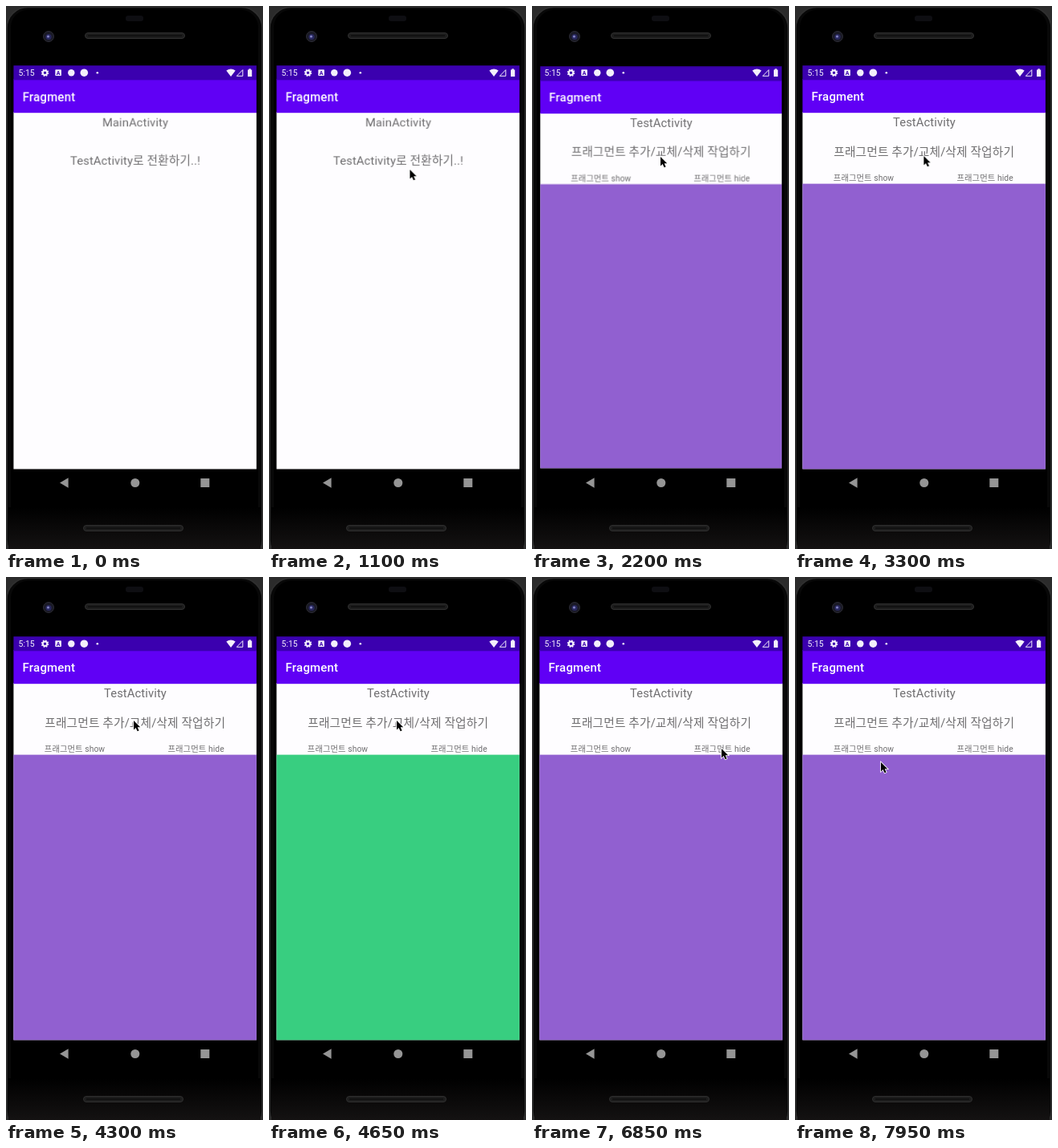
Animation of 320x677 px, one loop 8 s. Source, as an HTML page:

```html
<!DOCTYPE html>
<html lang="ko">
<head>
<meta charset="utf-8">
<title>Fragment demo</title>
<style>
html, body { margin: 0; width: 100%; height: 100%; overflow: hidden; background: #000; }
svg { display: block; width: 100%; height: 100%; }
text { font-family: Roboto, "Noto Sans CJK KR", "Noto Sans CJK", sans-serif; }

.bar { fill: #3b00af; }
.tool { fill: #6000f5; }
.page { fill: #fefdff; }
.title { font-size: 15px; font-weight: 500; letter-spacing: .0125em; fill: #fff; }
.label { font-size: 14.73px; letter-spacing: .008em; fill: #6f6e70; text-anchor: middle; }
.small { font-size: 10.31px; }
.clock { font-size: 10.4px; fill: #f3effb; }
.status { fill: #f3effb; }
.nav { fill: #959595; }

.window { transform-origin: 160.5px 343.5px; }
.leave { animation: leave 8s infinite, vanish 8s linear infinite; }
.enter { animation: enter 8s infinite, appear 8s linear infinite; }
.panel { animation: panel 8s step-end infinite; }
.cursor { animation: move 8s linear infinite, show 8s step-end infinite; }

/* Activity change: fast out, extra slow in */
@keyframes leave {
  0% { transform: scale(1); }
  24.325% { transform: scale(1); animation-timing-function: cubic-bezier(.3, 0, .8, .15); }
  25.24% { transform: scale(1.02); animation-timing-function: cubic-bezier(.05, .7, .1, 1); }
  29.825%, 100% { transform: scale(1.05); }
}
@keyframes enter {
  0% { transform: scale(.85); }
  24.325% { transform: scale(.85); animation-timing-function: cubic-bezier(.3, 0, .8, .15); }
  25.24% { transform: scale(.91); animation-timing-function: cubic-bezier(.05, .7, .1, 1); }
  29.825%, 100% { transform: scale(1); }
}
@keyframes appear {
  0%, 24.99% { opacity: 0; }
  25.6%, 100% { opacity: 1; }
}
@keyframes vanish {
  0%, 25.6% { opacity: 1; }
  26.8%, 100% { opacity: 0; }
}
@keyframes panel {
  0% { fill: #9160d0; }
  58.125% { fill: #38ce80; }
  85.625%, 100% { fill: #9160d0; }
}
@keyframes show {
  0% { opacity: 0; }
  2.5%, 100% { opacity: 1; }
}
@keyframes move {
  0%, 2.5% { transform: translate(98px, 307px); }
  3.75%, 5% { transform: translate(134px, 281px); }
  6.875%, 8.75% { transform: translate(190px, 220px); }
  19.375% { transform: translate(159px, 186px); }
  21.25%, 40.625% { transform: translate(160px, 188px); }
  51.25% { transform: translate(166px, 171px); }
  53.75%, 68.125% { transform: translate(159px, 179px); }
  73.75% { transform: translate(205px, 228px); }
  78.125% { transform: translate(227px, 210px); }
  78.75% { transform: translate(233px, 210px); }
  80.625% { transform: translate(239px, 209px); }
  83.125%, 94.375% { transform: translate(236px, 214px); }
  98.125% { transform: translate(122px, 239px); }
  99.375%, 100% { transform: translate(107px, 231px); }
}
</style>
</head>
<body>
<svg viewBox="0 0 320 677">
  <defs>
    <linearGradient id="chin" x1="0" y1="0" x2="0" y2="1">
      <stop offset="0" stop-color="#000"/>
      <stop offset="1" stop-color="#141212"/>
    </linearGradient>
    <clipPath id="screen"><rect x="9.4" y="74.2" width="302.5" height="539"/></clipPath>
    <g id="chrome">
      <rect x="9.4" y="74.2" width="302.5" height="539"/>
      <rect class="page" x="9.4" y="132" width="302.5" height="445.3"/>
      <rect class="tool" x="9.4" y="91" width="302.5" height="42.2"/>
      <rect class="bar" x="9.4" y="74.2" width="302.5" height="18.1"/>
      <text class="title" x="20.6" y="118.3">Fragment</text>
    </g>
    <g id="speaker">
      <rect x=".5" y=".5" width="124" height="7" rx="3.5" fill="#1d1d1d" stroke="#303030"/>
      <path d="M4 4H121" stroke="#111" stroke-width="2"/>
    </g>
  </defs>

  <!-- Phone body -->
  <rect width="320" height="677" fill="#2b2b2b"/>
  <rect x="1" y="1.5" width="318" height="690" rx="26" fill="#080808" stroke="#303030" stroke-width="1.5"/>
  <rect x="6" y="4.5" width="308" height="690" rx="22"/>
  <rect x="3" y="625" width="314" height="52" fill="url(#chin)"/>
  <rect x="149" y="12" width="22" height="7" rx="3" fill="#0e0e12"/>
  <use href="#speaker" x="98" y="33"/>
  <use href="#speaker" x="96" y="647"/>
  <circle cx="53" cy="38" r="6.5" fill="#1a1a26" stroke="#2c2c34"/>
  <circle cx="53" cy="38.5" r="3.6" fill="#28285e"/>
  <circle cx="52.5" cy="38" r="1.6" fill="#8080c0"/>

  <g clip-path="url(#screen)">
    <rect x="9" y="74" width="303" height="540"/>
    <g class="window leave">
      <use href="#chrome"/>
      <text class="label" x="161" y="150">MainActivity</text>
      <text class="label" x="161" y="198">TestActivity로 전환하기..!</text>
    </g>
    <g class="window enter">
      <use href="#chrome"/>
      <text class="label" x="161" y="150">TestActivity</text>
      <text class="label" x="160.7" y="186.5">프래그먼트 추가/교체/삭제 작업하기</text>
      <text class="label small" x="85.5" y="218.3">프래그먼트 show</text>
      <text class="label small" x="236.6" y="218.3">프래그먼트 hide</text>
      <rect class="panel" x="9.4" y="221.6" width="302.5" height="355.7"/>
    </g>
  </g>

  <!-- Status bar -->
  <text class="clock" x="15.6" y="87">5:15</text>
  <g class="status">
    <g fill="none" stroke="#f3effb">
      <circle cx="48.5" cy="83.2" r="2.7" stroke-width="2"/>
      <circle cx="48.5" cy="83.2" r="4" stroke-width="1.6" stroke-dasharray="1.7 1.44"/>
    </g>
    <rect x="61.3" y="79.3" width="7.6" height="7.8" rx=".8"/>
    <text x="65.1" y="85.8" font-size="7" font-weight="700" text-anchor="middle" fill="#3b00af">A</text>
    <circle cx="81.3" cy="83.2" r="4.2"/>
    <circle cx="97.3" cy="83.2" r="4.8"/>
    <circle cx="113.8" cy="83.2" r="1.3"/>
    <path d="M274.3 80.6Q280 76.6 285.7 80.6L280 88Z"/>
    <path d="M287.3 87.3L294.8 79.6V87.3Z" fill="none" stroke="#f3effb"/>
    <path d="M301 79.4H302.4V78.3H304.8V79.4H306.2V88H301Z"/>
  </g>

  <!-- Navigation bar -->
  <g class="nav">
    <path d="M67 594.5L77.6 588.3V600.7Z"/>
    <circle cx="160.8" cy="594.5" r="5.5"/>
    <rect x="242.3" y="589" width="11" height="11"/>
  </g>

  <path class="cursor" d="M0 0V11.4L2.6 9L4.6 13.3L6.6 12.4L4.7 8.2H8.2Z" stroke="#fff" stroke-width="1.6" paint-order="stroke"/>
</svg>
</body>
</html>
```
